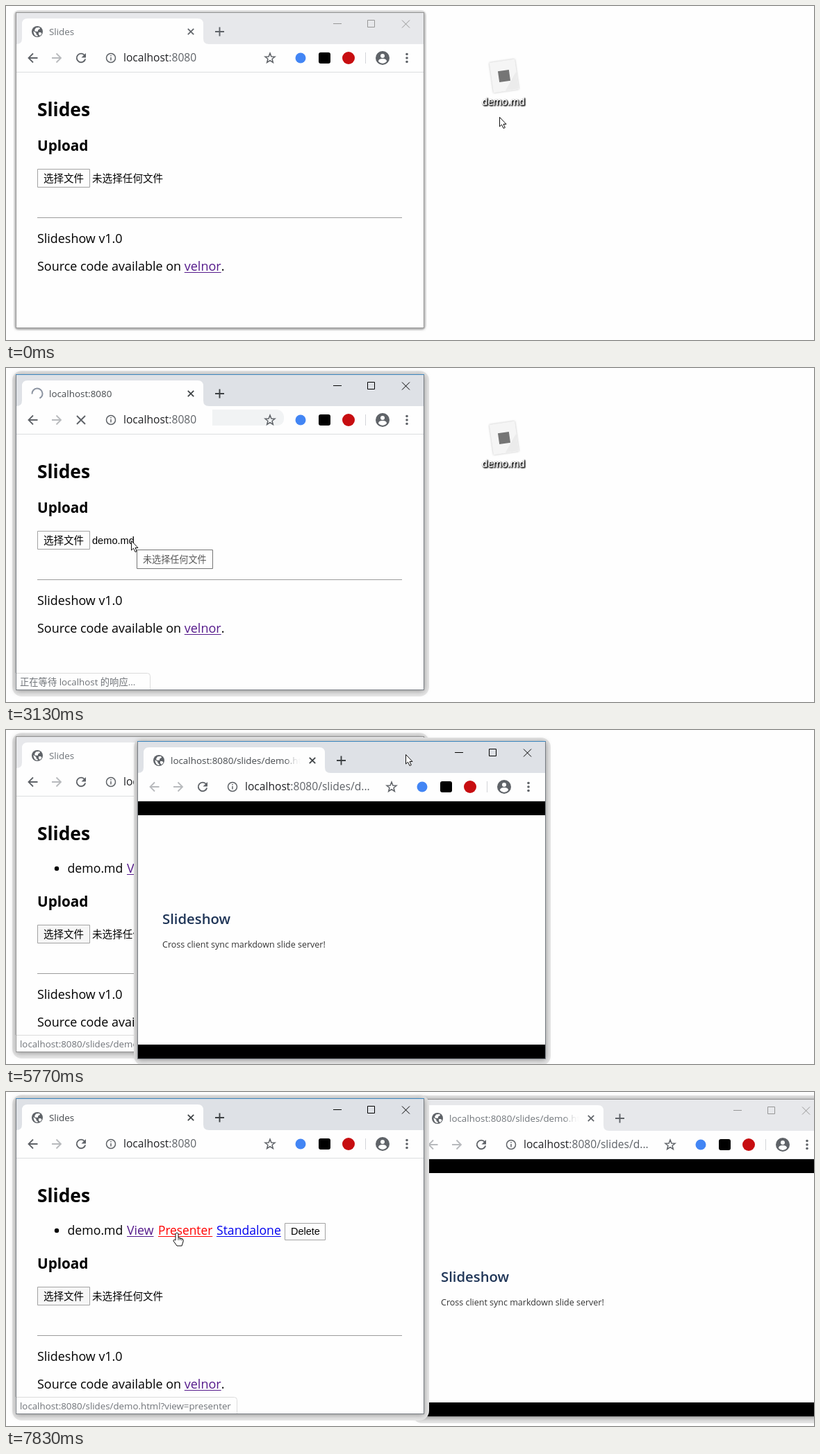
These frames come from a looping animation (1163x482 px, 8000 ms). An HTML page with a canvas:

```html
<!DOCTYPE html>
<html lang="zh-CN">
<head>
<meta charset="utf-8">
<title>Slides demo</title>
<style>
html, body { margin: 0; width: 100%; height: 100%; overflow: hidden; background: #fefefe; }
canvas { display: block; }
</style>
</head>
<body>
<canvas id="stage" width="1163" height="482"></canvas>
<script>
const c = document.getElementById('stage').getContext('2d');
const LOOP = 8000;
const UI = '"Open Sans","Noto Sans CJK SC","Noto Sans CJK JP",sans-serif';
const ARIAL = '"Liberation Sans","Noto Sans CJK SC","Noto Sans CJK JP",sans-serif';
const GREY = '#5f6368', PURPLE = '#551a8b', BLUE = '#0000ee', RED = '#ff0000';

// The picture only changes at evenly spaced steps inside these spans: start, end, steps.
const SPANS = [[310, 460, 2], [860, 1890, 9], [2040, 3010, 8], [3130, 4060, 8], [4340, 4340, 1],
  [4610, 5340, 6], [5620, 6430, 7], [6710, 7410, 6], [7830, 7830, 1]];

const POINTER = [[0, 710, 160], [300, 710, 160], [310, 712, 135], [460, 715, 108], [860, 695, 113],
  [1890, 180, 249], [3260, 180, 249], [4060, 185, 201], [4610, 185, 201], [4902, 205, 180],
  [5340, 411, 37], [5620, 430, 37], [6025, 866, 31], [6295, 976, 29], [6430, 959, 29],
  [6710, 905, 42], [7410, 246, 203]];
const SLIDE_WINDOW = [[5340, 11, 9], [5620, 30, 9], [6025, 466, 3], [6295, 576, 1]];

function stepTime(t) {
  let now = 0;
  for (const [a, b, n] of SPANS) {
    if (t < a) break;
    const gap = n > 1 ? (b - a) / (n - 1) : 1;
    now = a + Math.min(n - 1, Math.floor((t - a) / gap + 1e-6)) * gap;
  }
  return now;
}

function along(keys, t) {
  const i = keys.findIndex(k => k[0] > t);
  if (i < 0) return keys[keys.length - 1].slice(1);
  if (!i) return keys[0].slice(1);
  const [ta, xa, ya] = keys[i - 1], [tb, xb, yb] = keys[i], f = (t - ta) / (tb - ta);
  return [Math.round(xa + (xb - xa) * f), Math.round(ya + (yb - ya) * f)];
}

function text(s, x, y, size, color = '#000', family = UI, weight = 400) {
  c.font = `${weight} ${size}px ${family}`;
  c.fillStyle = color;
  c.fillText(s, x, y);
  return c.measureText(s).width;
}

function link(s, x, y, size, color) {
  const w = text(s, x, y, size, color);
  rect(x, y + 2, w, 1, color);
  return w;
}

function rect(x, y, w, h, color) {
  c.fillStyle = color;
  c.fillRect(x, y, w, h);
}

function round(x, y, w, h, r, fill, stroke) {
  c.beginPath();
  c.roundRect(x, y, w, h, r);
  if (fill) { c.fillStyle = fill; c.fill(); }
  if (stroke) { c.lineWidth = 1; c.strokeStyle = stroke; c.stroke(); }
}

function disc(x, y, r, color) {
  c.beginPath();
  c.arc(x, y, r, 0, 7);
  c.fillStyle = color;
  c.fill();
}

function line(d, color, width = 1) {
  c.strokeStyle = color;
  c.lineWidth = width;
  c.stroke(new Path2D(d));
}

function shape(d, color) {
  c.fillStyle = color;
  c.fill(new Path2D(d));
}

function cross(x, y, r, color, width) {
  line(`M${x - r} ${y - r}l${2 * r} ${2 * r}m0 ${-2 * r}l${-2 * r} ${2 * r}`, color, width);
}

function button(x, y, w, h, label, textX, baseline, fill) {
  round(x + .5, y + .5, w, h, 0, fill, '#a3a3a3');
  text(label, textX, baseline, 14.5, '#000', ARIAL);
}

function globe() {
  disc(45, 37, 8, GREY);
  shape('M39.5 36l4 3v2l2 1v2q-6-1-6-8zM43 31.5l5-.8 1 2-3 2v2h-4l-1-2zM47 38h3l1.5 2-2.5 3-2-2z', '#fff');
}

function spinner(t) {
  const a = -t / 330;
  c.beginPath();
  c.arc(45, 37, 7.5, a, a + 4.3);
  c.strokeStyle = '#8b93a0';
  c.lineWidth = 2;
  c.stroke();
}

function toolbar(o) {
  const back = o.slides ? '#b8babd' : GREY;
  line('M45.5 75h-13m6.5-6.5l-6.5 6.5 6.5 6.5', back, 1.8);
  line('M66 75h13m-6.5-6.5l6.5 6.5-6.5 6.5', '#b8babd', 1.8);
  if (o.loading) {
    cross(108, 75, 6, GREY, 1.9);
    round(297, 60, 103, 23, [0, 11, 9, 0], '#f1f3f4');
  } else {
    line('M113 71A6.3 6.3 0 1 0 114.2 76.5', GREY, 1.9);
    shape('M115 68v6.5h-6.5z', GREY);
  }
  line('M157.5 75a6.5 6.5 0 1 0-13 0a6.5 6.5 0 1 0 13 0M151 74v4.5m0-7.5v1.6', GREY, 1.5);
  const w = text('localhost', 169, 80, 15.6, '#202124');
  text(o.slides ? ':8080/slides/d...' : ':8080', 169 + w, 80, 15.6, GREY);

  c.beginPath();
  for (let i = 0; i < 10; i++) {
    const r = i % 2 ? 3.2 : 7.4, a = i * Math.PI / 5 - Math.PI / 2;
    c.lineTo(380 + r * Math.cos(a), 75.5 + r * Math.sin(a));
  }
  c.closePath();
  c.strokeStyle = GREY;
  c.lineWidth = 1.5;
  c.stroke();

  disc(424, 75, 7.5, '#4285f4');
  round(450, 67, 17, 16, 3, '#000');
  disc(493, 75, 9, '#c70d10');
  rect(517, 67, 1, 16, '#d3d5d8');
  disc(542, 75, 10, GREY);
  disc(542, 72, 3, '#fff');
  shape('M536 80q0-4 6-4t6 4q-2.500 3-6 3t-6-3z', '#fff');
  for (const y of [69.5, 75, 80.5]) disc(577, y, 1.8, GREY);
}

// Both windows share these coordinates; (dx, dy) shifts the whole window.
function browser(dx, dy, h, o, page) {
  const ink = o.active ? '#000' : '#979797', tabInk = o.active ? '#45494d' : '#70757a';
  c.save();
  c.translate(dx, dy);
  if (o.flat) round(11, 6, 594, h + 7, 8, '#e7e7e7');
  else round(9, 4, 600, h + 15, 14, '#e7e7e7');
  c.save();
  c.shadowColor = 'rgba(0,0,0,.4)';
  c.shadowBlur = o.flat ? 4 : 8;
  c.shadowOffsetY = 1;
  rect(14, 9, 588, h + 1, '#fefefe');
  c.restore();

  rect(14, 9, 588, 46, o.active ? '#dee1e6' : '#e7e8eb');
  shape('M15 55q8 0 8-8V26q0-8 8-8H276q8 0 8 8V47q0 8 8 8z', '#fefefe');
  if (o.loading) spinner(o.time); else globe();
  if (o.slides) {
    const fade = c.createLinearGradient(228, 0, 252, 0);
    fade.addColorStop(0, tabInk);
    fade.addColorStop(1, 'rgba(255,255,255,0)');
    text('localhost:8080/slides/demo.ht', 62, 42, 13.4, fade);
  } else text(o.loading ? 'localhost:8080' : 'Slides', 62, 42, 13.4, tabInk);
  cross(266, 37, 4.2, o.active ? '#3c4043' : GREY, 1.7);
  line('M301 37h13m-6.5-6.500v13', o.active ? '#3c4043' : GREY, 1.9);
  line('M471 25.5h12M520.500 20.500h10v10h-10z', ink);
  cross(575.5, 26, 5.5, ink, 1);
  toolbar(o);
  rect(14, 95, 588, 1, '#dcdee0');
  page();
  c.lineWidth = 1;
  c.strokeStyle = o.active ? '#777c82' : '#939393';
  c.strokeRect(14.5, 9.5, 587, h);
  if (o.active) rect(14, 9, 588, 1, '#3b87c0');
  c.restore();
}

function statusBar(s, w) {
  round(13.5, 440.5, w, 24, [0, 4, 0, 0], '#fefefe', '#dcdcdc');
  text(s, 20, 458, 13.3, '#6f7378');
}

function listPage(t) {
  const listed = t >= 3260, dy = listed ? 46 : 0;
  text('Slides', 45, 159, 26.4, '#000', UI, 700);
  if (listed) {
    disc(73, 200, 3.2, '#000');
    text('demo.md', 88.5, 206, 17.7);
    link('View', 174, 206, 17.8, t >= 4340 && t < 4610 ? RED : PURPLE);
    link('Presenter', 219, 206, 17.3, t >= 7830 ? RED : PURPLE);
    link('Standalone', 303, 206, 17.6, BLUE);
    button(401, 189, 58, 24, 'Delete', 410, 206, '#fdfdfd');
  }
  text('Upload', 45, 209 + dy, 20.7, '#000', UI, 700);
  button(45, 235 + dy, 75, 26, '选择文件', 54, 254 + dy, listed ? '#f6f6f6' : '#fdfdfd');
  const chosen = t >= 1880 && !listed;
  text(chosen ? 'demo.md' : '未选择任何文件', 124, 254 + dy, 14.6, '#000', ARIAL);
  rect(45, 305 + dy, 525, 1, '#9c9c9c');
  text('Slideshow v1.0', 45, 342 + dy, 17.9);
  const w = text('Source code available on ', 45, 382 + dy, 17.95);
  const end = 45 + w + link('velnor', 45 + w, 382 + dy, 18, PURPLE);
  text('.', end, 382 + dy, 18);

  if (t >= 2450 && !listed) {
    round(188.5, 262.5, 109, 27, 0, '#fefefe', '#767676');
    text('未选择任何文件', 197, 281, 13.1, '#575757');
  }
  if (t >= 2300 && !listed) statusBar('正在等待 localhost 的响应...', 194);
  if (t >= 4050 && t < 4750) statusBar('localhost:8080/.../demo.html', 194);
  if (t >= 4750 && t < 6900) statusBar('localhost:8080/slides/demo.html', 218);
  if (t >= 7400) statusBar('localhost:8080/slides/demo.html?view=presenter', 319);
}

function slidePage() {
  rect(14, 96, 588, 372, '#000');
  rect(14, 116, 588, 331, '#fefefe');
  text('Slideshow', 50, 273, 20.3, '#1f3557', UI, 600);
  text('Cross client sync markdown slide server!', 50, 307, 12.5, '#333');
}

function fileIcon(x, y, alpha) {
  c.save();
  c.globalAlpha = alpha;
  c.translate(x, y);
  c.save();
  c.rotate(-.14);
  c.shadowColor = 'rgba(0,0,0,.25)';
  c.shadowBlur = 3;
  round(-18.5, -22, 37, 44, 1, '#f5f5f5');
  c.shadowColor = 'transparent';
  shape('M18 -4V21H-1z', '#ebebeb');
  round(-8, -8, 16, 16, 0, '#757575');
  c.restore();
  c.shadowColor = '#000';
  c.shadowBlur = 2;
  c.shadowOffsetX = c.shadowOffsetY = 1;
  for (let i = 0; i < 3; i++) text('demo.md', -32, 42, 13.7, '#fff');
  c.restore();
}

function pointer(x, y, hand) {
  c.save();
  c.translate(x, y);
  const d = hand ? 'M-2 1.5Q0-1.5 2 1.5V7L8 9Q10 10 9 13L7 19H0L-5 12Q-5 9-2 11Z'
    : 'M.5 .5V14L3.500 11.200L6 16.500L8.300 15.500L6 10.500H10Z';
  shape(d, '#fff');
  line(d, '#111', 1);
  if (hand) line('M2 7v4m2.500-3.200v3m2.500-2.200v3', '#111', .8);
  c.restore();
}

function draw(t) {
  rect(0, 0, 1163, 482, '#fefefe');
  if (t >= 310 && t < 1000) round(676.5, 73.5, 80, 76, 0, '#e5f3ff', '#cce8ff');
  fileIcon(717, 101, 1);

  const list = () => browser(0, 0, 455, {
    active: t >= 2040 && t < 4750 || t >= 7830,
    loading: t >= 2170 && t < 3260,
    flat: t < 1000,
    time: t
  }, () => listPage(t));
  const slides = () => {
    if (t < 4750) return;
    const [dx, dy] = along(SLIDE_WINDOW, t);
    browser(dx, dy, 458, { active: t < 7830, slides: true }, slidePage);
  };
  if (t >= 7830) { slides(); list(); } else { list(); slides(); }

  const [x, y] = along(POINTER, t);
  if (t >= 860 && t < 1880) fileIcon(x, y, .55);
  pointer(x, y, t >= 4050 && t < 4750 || t >= 7400);
}

function tick(now) {
  draw(stepTime(now % LOOP));
  requestAnimationFrame(tick);
}
requestAnimationFrame(tick);
</script>
</body>
</html>
```
